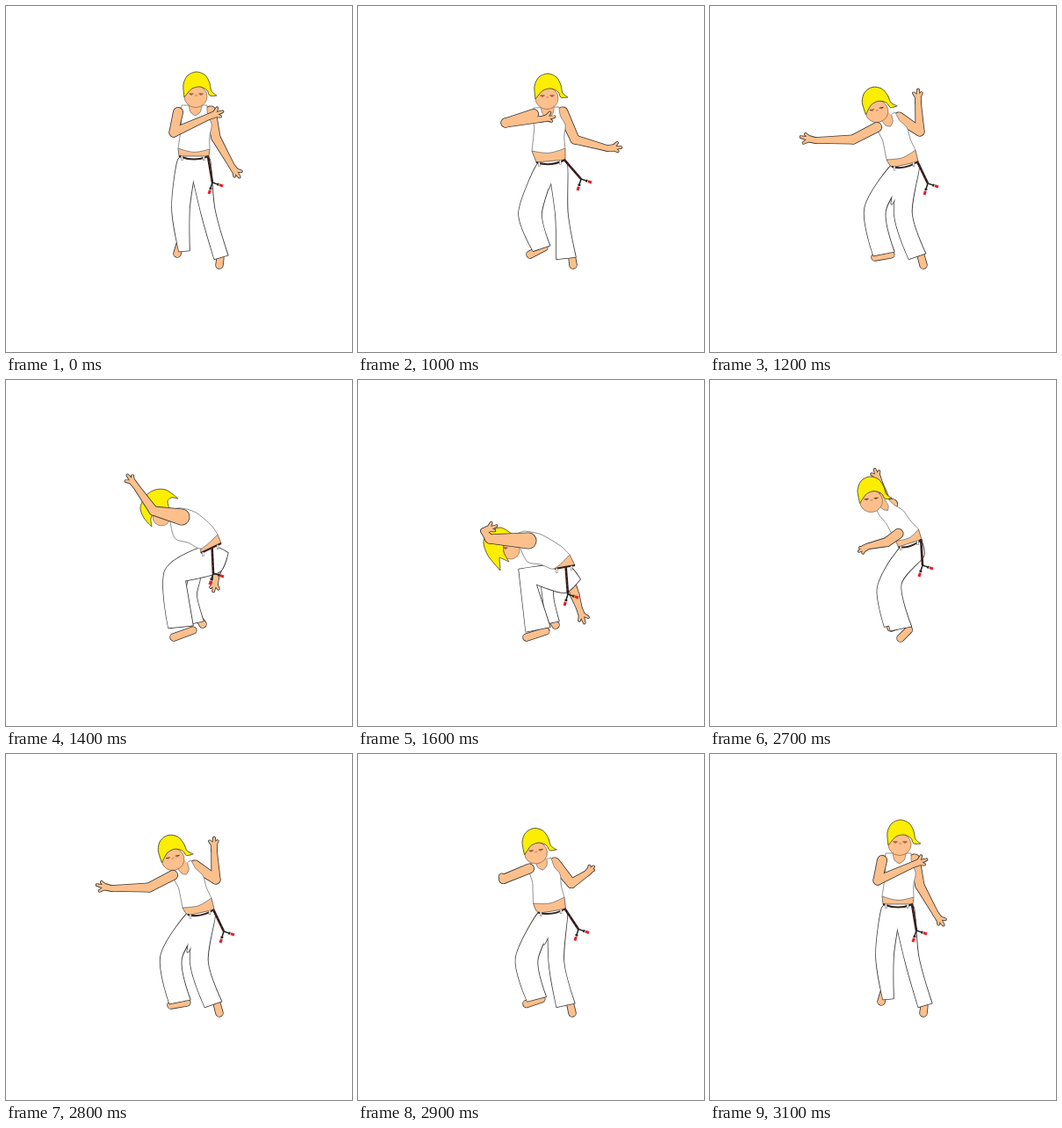
Write an HTML page with a canvas that moves like this. It is 394x394 px and loops after 3.2 s.

```html
<!DOCTYPE html>
<html lang="en">
<head>
<meta charset="utf-8">
<title>Ginga</title>
<style>
html, body { margin: 0; width: 100%; height: 100%; overflow: hidden; background: #fff; }
canvas { display: block; width: 100vw; height: 100vh; }
</style>
</head>
<body>
<canvas id="stage"></canvas>
<script>
const SIZE = 394, LOOP = 3200;
const SKIN = '#fdc08c', HAIR = '#fbee00', WHITE = '#fff', INK = '#3c3a38', GREY = '#707070';
const canvas = document.getElementById('stage');
const ctx = canvas.getContext('2d');

const points = text => text.split(',').map(p => p.trim().split(' ').map(Number));

// Hair around the face centre, shirt in the unit square of the torso.
const hairs = {
  front: points('-13 1, -14 -14, -9 -24, 1 -28, 11 -24, 16 -15, 18 -6, 24 -1, 16 -1, 13 -7, 5 -11, -4 -9, -9 -4'),
  side: points('-11 11, -20 1, -24 -11, -17 -25, -7 -31, 5 -31, 19 -21, 11 -22, 7 -18, 10 -6, -9 -4, -12 2'),
  low: points('-12 23, -26 6, -31 -8, -28 -18, -12 -26, 2 -18, -1 -9, -8 -7, -8 2, -2 13, -13 8')
};
const shirts = {
  front: points('0 0, .28 0, .36 .16, .53 .24, .72 .16, .8 0, 1 0, 1 .22, 1.12 .44, 1.02 .72, 1 1, .5 1.08, 0 1, .03 .7, .05 .45, -.02 .25'),
  side: points('0 0, 1 0, 1.35 .1, 1.55 .37, 1.25 .78, 1 1, 0 1, -.25 .7, -.75 .38')
};

// head: x y tilt; arms: shoulder elbow wrist fingertip; legs: hip knee hem with half widths;
// feet: heel toe; torso: corners clockwise; rest: belt ends, crotch, sash fork
const pose = (hair, head, farArm, nearArm, torso, farLeg, nearLeg, farFoot, nearFoot, rest) => ({
  hair, rig: [head, farArm, nearArm, torso, farLeg, nearLeg, farFoot, nearFoot, rest].map(points)
});

const stand = pose('front', '216 103 0',
  '196 121, 191 144, 231 126, 247 120', '233 120, 239 150, 257 182, 266 195',
  '200 113, 229 113, 232 163, 196 162',
  '206 176 10, 199 230 10, 203 279 6', '221 176 11, 230 234 8, 245 286 8',
  '198 271, 195 282', '244 287, 243 295', '197 171, 231 171, 212 199, 235 201');

const step = pose('front', '215 105 0',
  '200 123, 168 133, 208 129, 224 126', '233 121, 247 152, 284 162, 300 161',
  '200 116, 229 115, 236 162, 198 165',
  '214 183 10, 196 237 13, 209 276 10', '228 181 10, 232 238 7, 237 287 11',
  '212 275, 196 283', '244 288, 245 295', '203 178, 236 175, 217 207, 254 197');

const lean = pose('front', '190 120 -.22',
  '190 138, 163 152, 120 153, 103 149', '215 127, 239 143, 237 110, 237 95',
  '190 134, 211 121, 234 164, 201 175',
  '216 185 9.5, 188 232 12, 198 282 12', '228 182 10, 220 238 10, 236 285 10',
  '206 283, 188 286', '240 284, 243 295', '207 183, 237 177, 207 225, 248 202');

const dip = pose('side', '177 156 0',
  '239 212, 240 217, 239 226, 236 241', '200 156, 168 149, 148 121, 138 108',
  '187 158, 192 147, 241 176, 222 192',
  '215 225 6, 211 245 6, 218 276 7', '238 203 16, 193 222 13, 199 281 14',
  '222 275, 224 278', '213 285, 191 293', '222 197, 245 186, 215 212, 236 220');

const crouch = pose('low', '174 194 0',
  '241 225, 247 245, 252 260, 258 277', '194 183, 150 181, 143 172, 158 166',
  '183 186, 183 174, 241 199, 223 215',
  '215 230 6, 217 252 6, 222 276 7', '237 226 16, 193 224 13, 205 284 14',
  '223 276, 225 279', '214 286, 192 293', '224 215, 247 211, 205 225, 239 244');

const lerp = (a, b, t) => a.map((v, i) => v + (b[i] - v) * t);
const mix = (a, b, t, hair = a.hair) =>
  ({ hair, rig: a.rig.map((part, i) => part.map((p, j) => lerp(p, b.rig[i][j], t))) });
const along = (a, b) => Math.atan2(b[1] - a[1], b[0] - a[0]);
const polar = (p, angle, r) => [p[0] + r * Math.cos(angle), p[1] + r * Math.sin(angle)];

// Tangent at b; sharp turns stay corners.
function tangent(a, b, c) {
  const u = along(a, b), v = along(b, c);
  if (Math.cos(u - v) < .32) return [0, 0];
  const k = Math.min(Math.hypot(b[0] - a[0], b[1] - a[1]), Math.hypot(c[0] - b[0], c[1] - b[1])) / 2;
  return [(Math.cos(u) + Math.cos(v)) * k, (Math.sin(u) + Math.sin(v)) * k];
}

function blob(pts) {
  const n = pts.length, at = i => pts[(i + n) % n], path = new Path2D();
  path.moveTo(...pts[0]);
  for (let i = 0; i < n; i++) {
    const p = at(i), q = at(i + 1);
    const m = tangent(at(i - 1), p, q), w = tangent(p, q, at(i + 2));
    path.bezierCurveTo(p[0] + m[0] / 3, p[1] + m[1] / 3, q[0] - w[0] / 3, q[1] - w[1] / 3, q[0], q[1]);
  }
  path.closePath();
  return path;
}

function bone(a, ra, b, rb) {
  const path = new Path2D(), dir = along(a, b), q = Math.PI / 2;
  path.arc(a[0], a[1], ra - .3, dir + q, dir + 3 * q);
  path.arc(b[0], b[1], rb - .3, dir - q, dir + q);
  path.closePath();
  return path;
}

// Outlines the union of several paths.
function union(paths, fill, width = 1.7) {
  ctx.strokeStyle = INK;
  ctx.lineWidth = width;
  for (const p of paths) ctx.stroke(p);
  ctx.fillStyle = fill;
  for (const p of paths) ctx.fill(p);
}

function shape(path, fill, color, width) {
  ctx.fillStyle = fill;
  ctx.fill(path);
  ctx.strokeStyle = color;
  ctx.lineWidth = width;
  ctx.stroke(path);
}

function line(a, b, color, width, sag = 0) {
  const mid = lerp(a, b, .5);
  ctx.beginPath();
  ctx.moveTo(a[0], a[1]);
  ctx.quadraticCurveTo(mid[0], mid[1] + sag, b[0], b[1]);
  ctx.strokeStyle = color;
  ctx.lineWidth = width;
  ctx.stroke();
}

function arm([shoulder, elbow, wrist, tip], r) {
  const dir = along(wrist, tip), len = Math.hypot(tip[0] - wrist[0], tip[1] - wrist[1]);
  const palm = polar(wrist, dir, len * .35);
  const parts = [bone(shoulder, r, elbow, 5), bone(elbow, 5, wrist, 3.2), bone(wrist, 3.2, palm, 3.6)];
  for (const [turn, reach] of [[0, .62], [-.75, .5], [.6, .45]])
    parts.push(bone(palm, 2.4, polar(palm, dir + turn, len * reach), 1.3));
  union(parts, SKIN);
}

function leg([hip, knee, hem]) {
  const up = along(knee, hip), down = along(hem, knee);
  const bend = Math.atan2(Math.sin(up) + Math.sin(down), Math.cos(up) + Math.cos(down));
  const edge = side => [[hem, down], [knee, bend], [hip, up]]
    .map(([p, dir]) => polar(p, dir + side * Math.PI / 2, p[2]));
  return blob([...edge(-1), polar(hip, up, hip[2]), ...edge(1).reverse()]);
}

const foot = ([heel, toe]) => union([bone(heel, 4, toe, 4.2)], SKIN);

function head([x, y, tilt], hair) {
  const front = hair === 'front';
  ctx.save();
  ctx.translate(x, y);
  ctx.rotate(tilt);
  const face = new Path2D();
  face.ellipse(0, 0, front ? 13 : 10, front ? 12.5 : 10, 0, 0, 7);
  shape(face, SKIN, '#8a6545', .7);
  for (const ex of front ? [-5, 6] : [-6]) {
    line([ex - 2.5, -3], [ex + 2.5, -3], '#5a3a28', 1);
    line([ex - 1, -2], [ex + 1, -2], '#b3302a', .9);
  }
  if (front) line([-1, -1], [2, -1], '#a06a48', .7);
  shape(blob(hairs[hair]), HAIR, '#55502a', .9);
  ctx.restore();
}

function sash(left, right, fork, front) {
  for (const t of [.1, .83]) {
    const [x, y] = lerp(left, right, t);
    line([x, y], [x, y + 5], GREY, 2.4);
    line([x, y], [x, y + 4.5], WHITE, 1.3);
  }
  const base = lerp(left, right, front ? .97 : .55);
  line(base, fork, '#2b1a1a', 2.6);
  ctx.setLineDash([2, 3]);
  line(base, fork, '#a02a2e', .8);
  ctx.setLineDash([]);
  for (const [dx, dy] of [[12, 4], [-4, 13]]) {
    const tip = [fork[0] + dx, fork[1] + dy];
    line(fork, lerp(fork, tip, .6), '#222', 1.5);
    line(lerp(fork, tip, .45), lerp(fork, tip, .6), '#222', 3);
    line(lerp(fork, tip, .66), lerp(fork, tip, 1), '#ee1c25', 3);
  }
}

function draw({ hair, rig }) {
  const [[skull], farArm, nearArm, torso, farLeg, nearLeg, farFoot, nearFoot, rest] = rig;
  const [left, right, crotch, fork] = rest, front = hair === 'front';
  const [tl, tr, br, bl] = torso;
  const onTorso = ([u, v]) => lerp(lerp(tl, tr, u), lerp(bl, br, u), v);
  const scale = canvas.width / SIZE;
  ctx.setTransform(scale, 0, 0, scale, 0, 0);
  ctx.fillStyle = WHITE;
  ctx.fillRect(0, 0, SIZE, SIZE);
  ctx.lineJoin = 'round';

  if (front) arm(nearArm, 6);
  else arm(farArm, 4.5);
  foot(farFoot);
  if (front) {
    foot(nearFoot);
    union([leg(farLeg), leg(nearLeg), bone(lerp(left, right, .5), 10, crotch, 1)], WHITE, 1.6);
  } else {
    union([leg(farLeg)], WHITE, 1.6);
    foot(nearFoot);
    union([leg(nearLeg)], WHITE, 1.6);
  }
  shape(blob([bl, br, right, left]), SKIN, INK, .7);
  line(left, right, '#35211f', 2, front ? 7 : 0);
  if (front) {
    ctx.fillStyle = SKIN;
    ctx.fill(bone(skull, 8, onTorso([.53, .1]), 8));
  }
  shape(blob(shirts[front ? 'front' : 'side'].map(onTorso)), WHITE, GREY, .8);
  head(skull, hair);
  if (front) arm(farArm, 5.5);
  else arm(nearArm, 9);
  sash(left, right, fork, front);
}

const turn = mix(lean, dip, .5), sway = mix(step, lean, .5);
const sink = mix(dip, crouch, 1.03, 'low');
const BEAT = 100, HOLD = 1000;
const descent = [step, sway, lean, turn, dip, sink];
const rise = [dip, turn, lean, sway, step, stand];

function poseAt(t) {
  if (t < HOLD) return stand;
  const fall = Math.floor((t - HOLD) / BEAT);
  if (fall < descent.length) return descent[fall];
  const climb = Math.floor((t - 2 * HOLD - descent.length * BEAT) / BEAT);
  return climb < 0 ? crouch : rise[climb];
}

function resize() {
  canvas.width = canvas.height = Math.round(SIZE * (window.devicePixelRatio || 1));
}

const start = performance.now();
function frame() {
  draw(poseAt(Math.max(0, performance.now() - start) % LOOP));
  requestAnimationFrame(frame);
}

resize();
frame();
</script>
</body>
</html>
```
